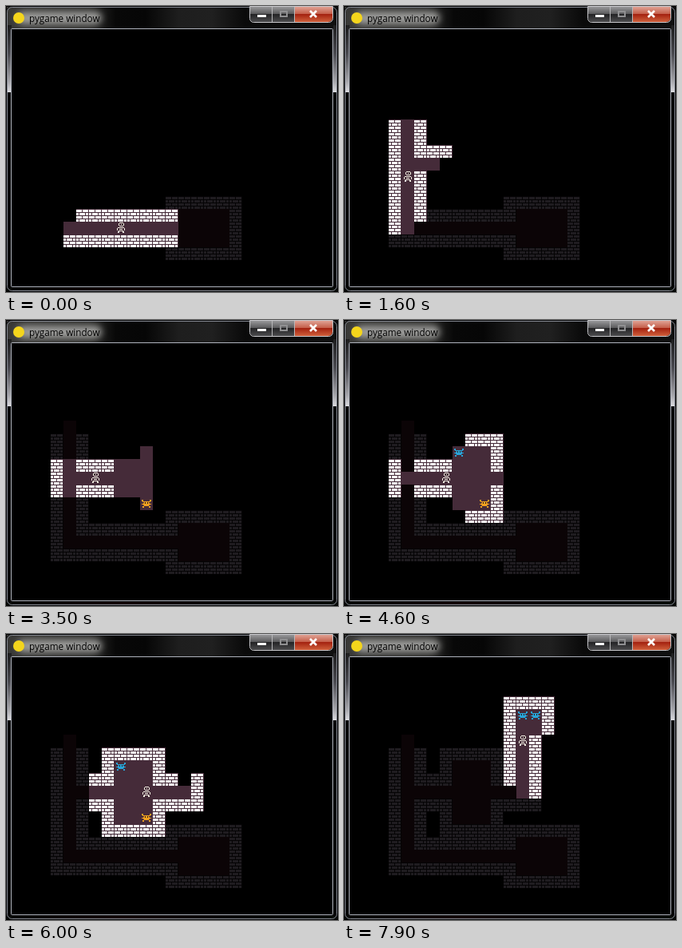
Animation of 416 by 358 pixels, one loop 8 s. Source, as an HTML page with a canvas:

```html
<!DOCTYPE html>
<html>
<head>
<meta charset="utf-8">
<style>
html, body { margin: 0; width: 100%; height: 100%; overflow: hidden; background: #000; }
canvas { position: absolute; left: 0; top: 0; }
#title { position: absolute; left: 29px; top: 6px; font: 11.7px/18px "Open Sans", "Noto Sans", sans-serif; color: #000; white-space: nowrap; }
</style>
</head>
<body>
<canvas id="stage" width="416" height="358"></canvas>
<div id="title">pygame window</div>
<script>
const ctx = document.getElementById('stage').getContext('2d');
const LOOP = 8000, TILE = 16, LEFT = 8, TOP = 30, REACH = 4;

// Open floor as x, y, width, height; everything else is rock.
const rooms = [
  [13, 14, 4, 3], [4, 15, 9, 1], [4, 4, 1, 12], [3, 6, 3, 1], [5, 10, 3, 1],
  [8, 8, 3, 5], [11, 10, 3, 1], [13, 4, 1, 7], [13, 4, 2, 2]
];
const monsters = [
  [10, 12, '#f0a020'], [8, 8, '#28a4d8'], [13, 4, '#28a4d8'], [14, 4, '#28a4d8']
];
// Each step: time of arrival and direction.
const start = [8, 15];
const steps = [
  [200, 'L'], [400, 'L'], [500, 'L'], [700, 'L'], [900, 'U'],
  [1100, 'U'], [1300, 'U'], [1500, 'U'], [1700, 'U'], [2100, 'R'],
  [2700, 'R'], [3800, 'R'], [5000, 'R'], [5300, 'R'], [5600, 'R'],
  [6300, 'R'], [6500, 'R'], [6800, 'R'], [7000, 'U'], [7200, 'U'],
  [7500, 'U'], [7800, 'U']
];
const moves = { L: [-1, 0], R: [1, 0], U: [0, -1] };

const key = (x, y) => x + y * 32;
const floor = new Set();
for (const [x, y, w, h] of rooms)
  for (let j = 0; j < h; j++)
    for (let i = 0; i < w; i++) floor.add(key(x + i, y + j));

function clearLine(px, py, dx, dy, bias) {
  const n = Math.max(Math.abs(dx), Math.abs(dy));
  for (let i = 1; i < n; i++) {
    const k = i / n * (1 + bias);
    if (!floor.has(key(Math.round(px + dx * k), Math.round(py + dy * k)))) return false;
  }
  return true;
}

const offsets = [];
for (let dy = -REACH; dy <= REACH; dy++)
  for (let dx = -REACH; dx <= REACH; dx++) offsets.push([dx, dy]);
offsets.sort((a, b) => Math.abs(a[0]) + Math.abs(a[1]) - Math.abs(b[0]) - Math.abs(b[1]));

function view(px, py) {
  const lit = new Set();
  for (const [dx, dy] of offsets) {
    const x = px + dx, y = py + dy, bx = x - Math.sign(dx), by = y - Math.sign(dy);
    // Walls also light up beside a lit floor and its lit neighbours.
    const corner = dx && dy && !floor.has(key(x, y)) && floor.has(key(bx, by)) &&
      [key(bx, by), key(bx, y), key(x, by)].every(k => lit.has(k));
    if (corner || clearLine(px, py, dx, dy, .01) || clearLine(px, py, dx, dy, -.01))
      lit.add(key(x, y));
  }
  return lit;
}

const seen = new Set();
const states = [];
function visit(time, x, y) {
  const lit = view(x, y);
  lit.forEach(k => seen.add(k));
  states.push({ time, x, y, lit, seen: new Set(seen) });
}
for (let x = 15; x > start[0]; x--) view(x, start[1]).forEach(k => seen.add(k));
let [hx, hy] = start;
visit(0, hx, hy);
for (const [time, dir] of steps) {
  hx += moves[dir][0];
  hy += moves[dir][1];
  visit(time, hx, hy);
}

function rect(color, x, y, w, h) {
  ctx.fillStyle = color;
  ctx.fillRect(x, y, w, h);
}

function shade(x0, y0, x1, y1, ...stops) {
  const g = ctx.createLinearGradient(x0, y0, x1, y1);
  stops.forEach(([at, color]) => g.addColorStop(at, color));
  return g;
}

function outline(color, x, y, w, h, r) {
  ctx.strokeStyle = color;
  ctx.beginPath();
  ctx.roundRect(x + .5, y + .5, w, h, r);
  ctx.stroke();
}

function drawWindow() {
  rect('#000', 0, 0, 416, 358);
  rect(shade(0, 0, 416, 0, [0, '#3a3a38'], [.25, '#2c2c2a'], [.33, '#080808'], [.42, '#060606'],
    [.52, '#1e1e1e'], [.62, '#202020'], [.72, '#0a0a0a'], [1, '#101010']), 1, 1, 414, 28);

  ctx.save();
  ctx.filter = 'blur(4px)';
  ctx.fillStyle = '#9c9c9a';
  ctx.beginPath();
  ctx.roundRect(14, 7, 106, 16, 8);
  ctx.fill();
  ctx.restore();

  const side = shade(0, 20, 0, 108, [0, '#181818'], [.45, '#4c4c52'], [.85, '#a9a9ae'], [1, '#dcdce0']);
  for (const x of [1, 410]) rect(side, x, 24, 6, 84);
  rect('#050505', 1, 108, 6, 249);
  rect('#050505', 410, 108, 5, 249);
  rect(shade(0, 0, 416, 0, [0, '#0a0c0a'], [.35, '#160808'], [.7, '#0a0a08'], [1, '#0c100c']), 1, 353, 414, 4);

  outline('#000', 0, 0, 415, 357, 7);
  outline('#868a94', 1, 1, 413, 355, 6);
  rect('#000', 7, 29, 402, 322);
  outline('#b0b4be', 6, 28, 403, 323, 1);

  // Icon
  ctx.fillStyle = '#f4d51c';
  ctx.beginPath();
  ctx.arc(16, 15, 7, 0, 7);
  ctx.fill();

  // Caption buttons
  const gray = shade(0, 1, 0, 20, [0, '#98989a'], [.45, '#5c5c5e'], [.5, '#242426'], [1, '#4c4c4e']);
  const red = shade(0, 1, 0, 20, [0, '#e0a294'], [.45, '#c5604c'], [.5, '#a42210'], [1, '#d0603c']);
  ctx.save();
  ctx.beginPath();
  ctx.roundRect(306, 1, 103, 19, [0, 0, 5, 5]);
  ctx.clip();
  rect(gray, 306, 1, 56, 19);
  rect(red, 362, 1, 47, 19);
  rect('#b8b8ba', 333, 1, 1, 19);
  rect('#b8b8ba', 361, 1, 1, 19);
  ctx.restore();
  outline('#c4c4c8', 305, 0, 104, 20, [0, 0, 5, 5]);
  rect('#fff', 315, 11, 11, 3);
  ctx.lineWidth = 2;
  ctx.strokeStyle = '#909092';
  ctx.strokeRect(344, 7, 8, 6);
  ctx.strokeStyle = '#fff';
  ctx.lineWidth = 2.6;
  ctx.beginPath();
  ctx.moveTo(381, 6); ctx.lineTo(389, 14);
  ctx.moveTo(389, 6); ctx.lineTo(381, 14);
  ctx.stroke();
  ctx.lineWidth = 1;
}

function drawWall(x, y, lit) {
  rect(lit ? '#452b39' : '#040304', x, y, TILE, TILE);
  const brick = lit ? '#fff' : '#1f1c20';
  for (let row = 0; row < 4; row++) {
    const joints = row % 2 ? [3, 11, 15] : [7, 15];
    let from = 0;
    for (const to of joints) {
      rect(brick, x + from, y + row * 4 + 1, to - from, 3);
      from = to + 1;
    }
  }
}

function drawMonster(x, y, color) {
  for (const [a, b, w, h] of [[5, 5, 6, 6], [4, 7, 8, 3], [2, 3, 2, 2], [12, 3, 2, 2],
    [3, 5, 2, 1], [11, 5, 2, 1], [2, 8, 12, 1], [3, 11, 2, 2], [11, 11, 2, 2]])
    rect(color, x + a, y + b, w, h);
  rect('#301c18', x + 6, y + 6, 1, 2);
  rect('#301c18', x + 9, y + 6, 1, 2);
}

function drawHero(x, y) {
  for (const [a, b, w, h] of [[6, 1, 5, 1], [5, 2, 1, 3], [8, 3, 1, 1], [11, 2, 1, 3],
    [6, 5, 5, 1], [4, 7, 8, 1], [3, 8, 1, 3], [12, 8, 1, 3], [6, 9, 4, 1],
    [5, 11, 6, 1], [4, 12, 2, 2], [10, 12, 2, 2]])
    rect('#f0ece0', x + a, y + b, w, h);
}

function drawMap({ x, y, lit, seen }) {
  rect('#000', 7, 29, 402, 322);
  for (const k of seen) {
    const px = LEFT + k % 32 * TILE, py = TOP + (k >> 5) * TILE, on = lit.has(k);
    if (floor.has(k)) rect(on ? '#452b39' : '#0b0406', px, py, TILE, TILE);
    else drawWall(px, py, on);
  }
  for (const [mx, my, color] of monsters)
    if (lit.has(key(mx, my))) drawMonster(LEFT + mx * TILE, TOP + my * TILE, color);
  drawHero(LEFT + x * TILE, TOP + y * TILE);
}

let shown;
function tick() {
  const t = performance.now() % LOOP;
  const state = states.filter(s => s.time <= t).pop();
  if (state !== shown) drawMap(shown = state);
  requestAnimationFrame(tick);
}
drawWindow();
tick();
</script>
</body>
</html>
```
